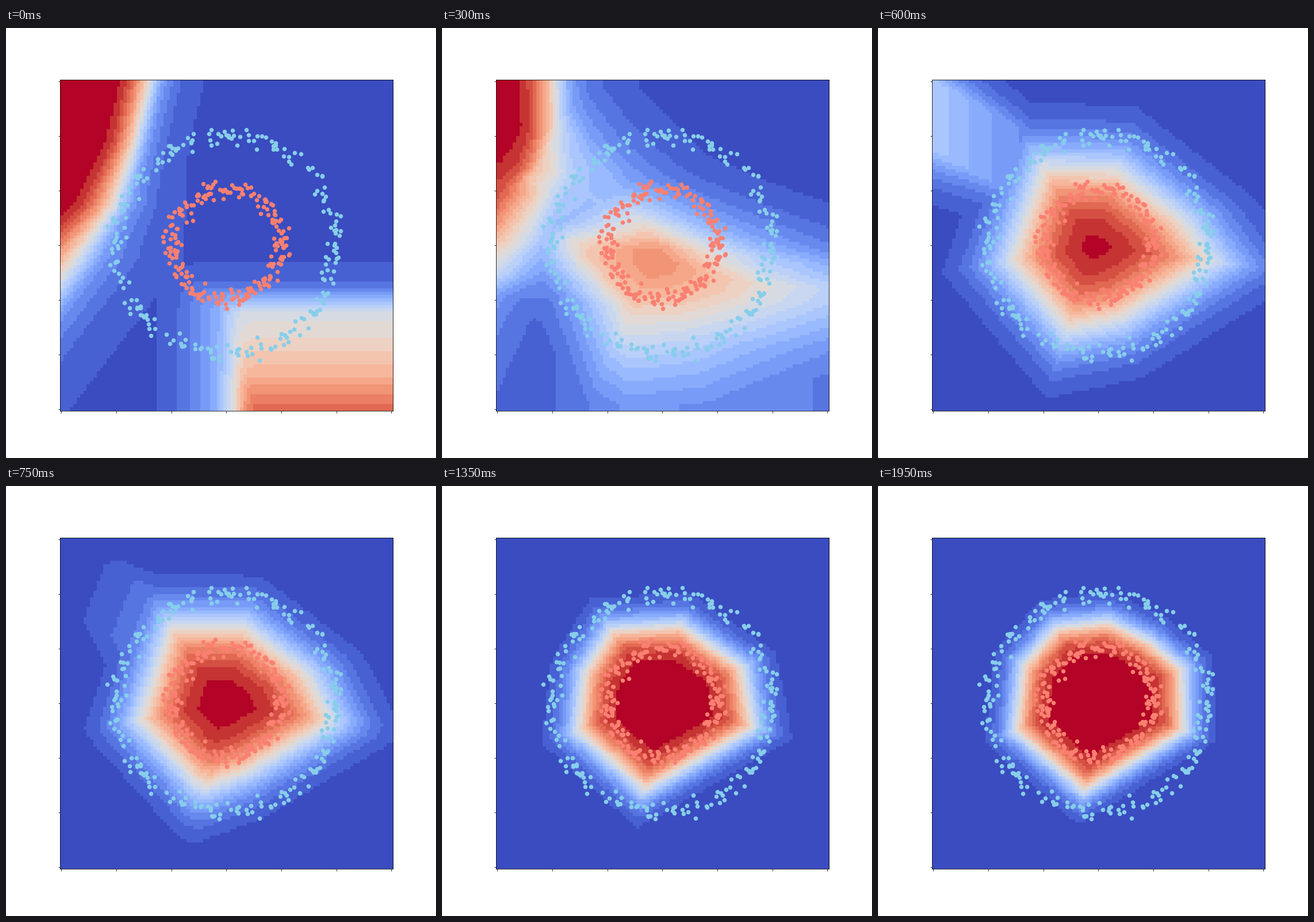
These frames come from a looping animation (748x748 px, 2 s). A matplotlib script:

```python
import numpy as np
import matplotlib.pyplot as plt
from matplotlib.animation import FuncAnimation

SIZE, DPI = 748, 88
PX = 72 / DPI  # one pixel in points
FRAMES, N = 40, 100
LEFT, RIGHT = 0.125 * SIZE, 0.9 * SIZE
TOP, BOTTOM = 0.12 * SIZE, 0.89 * SIZE
CX, CY = (LEFT + RIGHT) / 2, (TOP + BOTTOM) / 2
UX, UY = (RIGHT - LEFT) * 0.33, (BOTTOM - TOP) * 0.33

cells = (np.arange(N) + 0.5) / N
X, Y = np.meshgrid(LEFT + cells * (RIGHT - LEFT), TOP + cells * (BOTTOM - TOP))


def blob(steep, cx, cy, corners):
    """Logit falling linearly from a centre, zero on a convex polygon."""
    c = np.array(corners, float) - (cx, cy)
    px, py = X - cx, Y - cy
    gauge = np.zeros_like(X)
    for (ax, ay), (bx, by) in zip(c, np.roll(c, -1, axis=0)):
        ex, ey = bx - ax, by - ay
        gauge = np.maximum(gauge, (ex * py - ey * px) / (ex * ay - ey * ax))
    return steep * (1 - gauge)


def corner(ys, xs):
    """Red top-left region bounded by a polyline x(y)."""
    d = (np.interp(Y, ys, xs) - X) * np.interp(Y, [200, 400], [1, 0.5])
    return np.interp(d, [-400, -115, -58, -25, 0, 30, 65],
                     [-6, -3.4, -2.4, -1.4, 0, 1.6, 3.9])


def soft_min(a, b):
    return -np.logaddexp(-2 * a, -2 * b) / 2


def two_corners():
    shelf = soft_min(
        np.interp(Y, [90, 385, 435, 465, 495, 540, 600, 665],
                  [-7, -3.5, -2.5, -1.2, -0.1, 0.2, 0.7, 1.9]),
        np.interp(X, [150, 250, 290, 330, 370, 395, 430],
                  [-4, -3.2, -2.5, -1.6, -0.9, 0, 2]))
    return np.maximum(corner([90, 200, 310, 437, 665], [250, 224, 186, 94, -80]), shelf)


def plateau():
    edge = np.interp(X, [215, 345, 470, 560, 673], [372, 388, 430, 447, 453])
    shelf = soft_min(
        np.interp(Y - edge, [-300, -150, -75, -35, -12, 0, 25, 70, 110],
                  [-6, -3.9, -2.7, -1.6, -0.5, 0.1, 0.4, 0.25, 0]),
        np.interp(X - np.interp(Y, [380, 480], [210, 300]),
                  [-170, -95, -50, 0, 40], [-3.3, -2.1, -1.2, -0.2, 1.5]))
    return np.maximum(corner([90, 250, 300, 370, 437, 665], [200, 197, 178, 148, 94, -80]),
                      shelf)


def bridge():
    body = blob(2.7, 380, 380, [
        (225, 165), (340, 222), (420, 252), (560, 350), (660, 408),
        (420, 508), (315, 522), (222, 405), (195, 250)])
    side = np.interp(Y, [200, 285, 330, 430, 470, 540, 665],
                     [-3, -0.1, -0.3, -0.8, -2, -3.2, -3.8])
    side -= np.maximum(X - 190, 0) / 30
    peak = 0.65 * corner([90, 170, 230, 285, 450], [190, 200, 165, 94, -80])
    return np.maximum(np.maximum(body, side), peak)


def fading():
    body = blob(3.6, 375, 380, [
        (288, 243), (415, 248), (527, 335), (578, 405), (420, 504),
        (330, 523), (232, 405)])
    off = np.abs(Y - 150 - 0.55 * (X - LEFT))
    ridge = -0.6 - np.maximum(off - 60, 0) / 40 - 0.006 * (X - LEFT)
    return np.maximum(body, ridge)


pentagon = blob(5.8, 380, 375, [
    (285, 247), (415, 245), (520, 320), (550, 415), (350, 525), (235, 410)])
hexagon = blob(7, 382, 375, [
    (295, 250), (415, 243), (520, 315), (540, 420), (352, 528), (236, 425),
    (248, 325)])
rounded = blob(8, 384, 375, [
    (310, 247), (400, 237), (470, 270), (527, 318), (531, 425), (358, 530),
    (239, 425), (253, 312)])

TIMES = [0, 4, 8, 12, 20, 27, 39]
FIELDS = [two_corners(), plateau(), bridge(), fading(), pentagon, hexagon, rounded]


def probability(frame):
    k = min(np.searchsorted(TIMES, frame, side="right"), len(TIMES) - 1)
    u = (frame - TIMES[k - 1]) / (TIMES[k] - TIMES[k - 1])
    return 1 / (1 + np.exp(-(FIELDS[k - 1] * (1 - u) + FIELDS[k] * u)))


rng = np.random.default_rng(7)


def ring(radius, angle):
    dots = np.column_stack([CX + radius * UX * np.cos(angle),
                            CY + radius * UY * np.sin(angle)])
    return dots + rng.normal(0, 8.5, dots.shape).clip(-18, 18)


# Dots in each ten degree sector of the outer ring, clockwise from the right
COUNTS = [10, 6, 6, 9, 5, 7, 7, 5, 7, 8, 5, 7, 2, 8, 8, 6, 5, 6,
          10, 3, 7, 6, 5, 7, 9, 6, 7, 8, 6, 7, 6, 4, 5, 5, 7, 7]
outer = ring(1, np.radians(np.concatenate(
    [10 * i + 10 * (np.arange(n) + 0.5) / n for i, n in enumerate(COUNTS)])))
inner = ring(0.5, np.linspace(0, 2 * np.pi, 230, endpoint=False))

fig = plt.figure(figsize=(SIZE / DPI, SIZE / DPI), dpi=DPI, facecolor="white")
ax = fig.add_axes([0.125, 0.11, 0.775, 0.77])
image = ax.imshow(probability(0), cmap=plt.get_cmap("coolwarm", 22), vmin=0, vmax=1,
                  extent=(LEFT, RIGHT, BOTTOM, TOP), aspect="auto",
                  interpolation="nearest")
for dots, color in ((outer, "skyblue"), (inner, "salmon")):
    ax.scatter(*dots.T, s=(6 * PX) ** 2, color=color, linewidths=1.5 * PX)

steps = np.arange(-3, 4) / 2
ax.set(xlim=(LEFT, RIGHT), ylim=(BOTTOM, TOP),
       xticks=CX + UX * steps, yticks=CY + UY * steps)
ax.tick_params(length=3.5 * PX, width=0.8 * PX, labelbottom=False, labelleft=False)
for spine in ax.spines.values():
    spine.set_linewidth(0.8 * PX)


def update(frame):
    image.set_data(probability(frame))
    return [image]


anim = FuncAnimation(fig, update, frames=FRAMES, interval=50, repeat=True)
plt.show()
```
